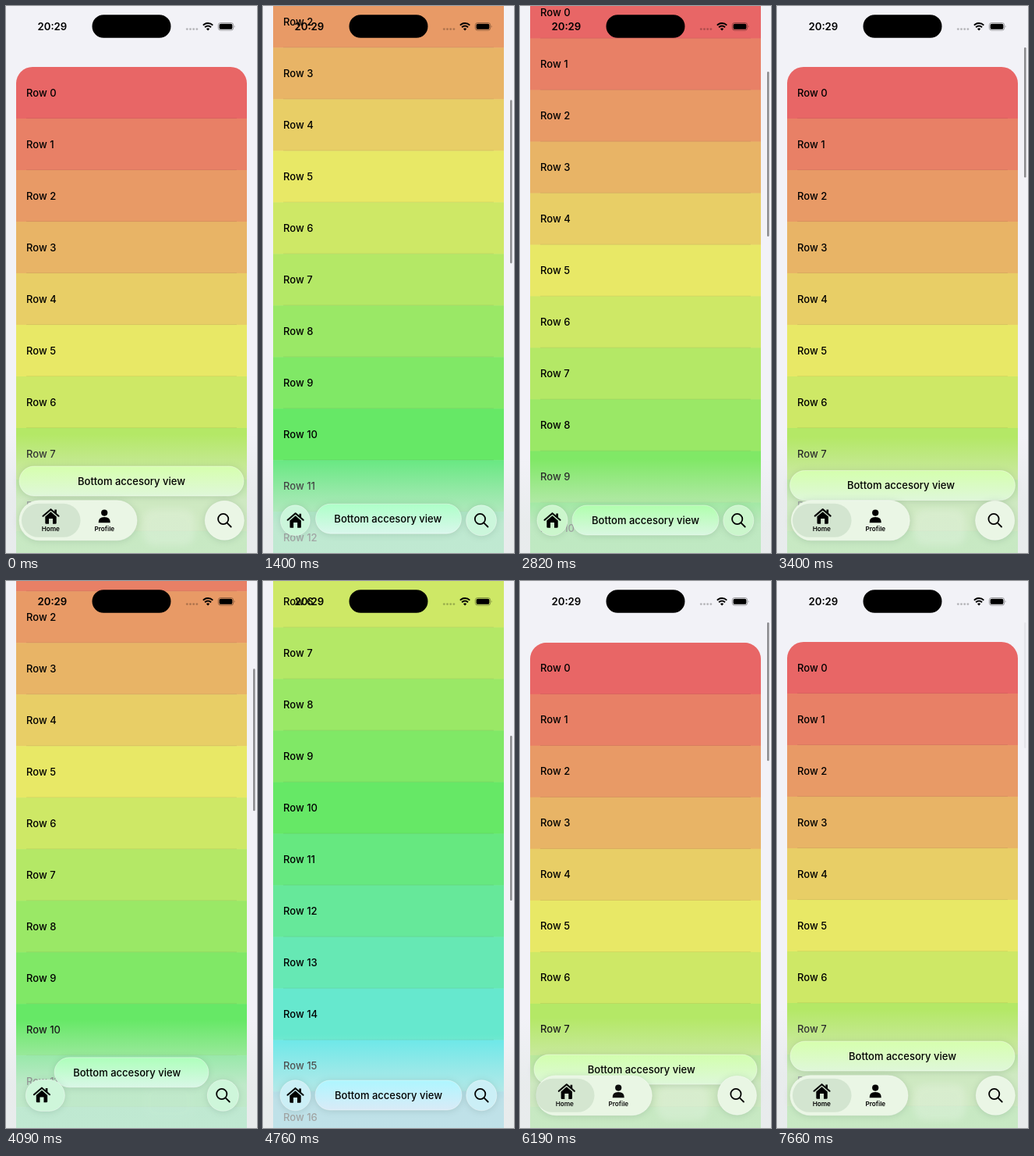
Animation of 322 by 700 pixels, one loop 7.87 s. Source, as an HTML page:

```html
<!DOCTYPE html>
<html lang="en">
<head>
<meta charset="utf-8">
<title>Collapsing tab bar</title>
<style>
  html, body { margin: 0; width: 100%; height: 100%; overflow: hidden; background: #f2f2f7; }
  svg { display: block; width: 100%; height: 100%; }
  text { font: 500 13px Inter, Roboto, sans-serif; }
  .time { font-weight: 600; font-size: 13.2px; }
  .label { font-weight: 600; font-size: 8.2px; text-anchor: middle; }
  .glass { stroke: #fff; stroke-opacity: .5; stroke-width: .8; filter: drop-shadow(0 1px 4px rgba(0, 40, 20, .13)); }
</style>
</head>
<body>
<svg viewBox="0 0 322 700">
  <defs>
    <clipPath id="card"><rect x="13" y="78" width="296" height="1980" rx="21"/></clipPath>
    <linearGradient id="fade" x1="0" y1="0" x2="0" y2="1">
      <stop offset="0" stop-color="#e4e9e8" stop-opacity="0"/>
      <stop offset=".3" stop-color="#e4e9e8" stop-opacity=".4"/>
      <stop offset=".55" stop-color="#e4e9e8" stop-opacity=".7"/>
      <stop offset="1" stop-color="#e4e9e8" stop-opacity=".72"/>
    </linearGradient>
    <linearGradient id="tint" x1="0" y1="0" x2="0" y2="1">
      <stop id="tintTop" offset="0"/>
      <stop id="tintEnd" offset="1"/>
    </linearGradient>
    <filter id="soft"><feGaussianBlur stdDeviation="4"/></filter>
  </defs>
  <rect width="322" height="700" fill="#f2f2f7"/>
  <g id="list"><g id="rows" clip-path="url(#card)"></g></g>
  <rect id="veil" width="322" height="152" fill="url(#fade)"/>
  <rect id="glow" x="176" y="644" width="66" height="46" rx="14" fill="#fff" opacity=".2" filter="url(#soft)"/>

  <g id="status">
    <text class="time" x="40.5" y="31">20:29</text>
    <rect x="110.5" y="11.2" width="101" height="29.6" rx="14.8"/>
    <g fill="#000" opacity=".25">
      <circle cx="232.3" cy="29.6" r="1.4"/><circle cx="236.5" cy="29.6" r="1.4"/>
      <circle cx="240.7" cy="29.6" r="1.4"/><circle cx="244.9" cy="29.6" r="1.4"/>
    </g>
    <g fill="none" stroke="#000" stroke-width="2">
      <path d="M252.9 24.6a8.7 8.7 0 0 1 12.4 0M255.2 27.2a5.5 5.5 0 0 1 7.8 0"/>
    </g>
    <path d="M257 29.2a3 3 0 0 1 4.2 0L259.1 31.5Z"/>
    <rect x="272.3" y="21.5" width="19.4" height="9.6" rx="3" fill="none" stroke="#000" stroke-opacity=".4" stroke-width=".9"/>
    <rect x="273.6" y="22.8" width="16.8" height="7" rx="1.9"/>
    <path d="M292.8 24.8q1.6 1.5 0 3Z" opacity=".45"/>
  </g>

  <rect id="bar" x="317" width="2.6" rx="1.3" fill="#000" fill-opacity=".42"/>

  <rect id="pill" class="glass" height="38" rx="19" fill="url(#tint)"/>
  <text id="pillText" text-anchor="middle">Bottom accesory view</text>

  <rect id="tabs" class="glass"/>
  <g id="tabDetails">
    <rect x="20" y="636.8" width="75.5" height="43" rx="21.5" fill="#1c5c28" fill-opacity=".11"/>
    <text class="label" x="57.3" y="672.3">Home</text>
    <text class="label" x="126.3" y="672.3">Profile</text>
    <circle cx="126.2" cy="648.6" r="4.1"/>
    <path d="M118.7 661.3q-.4-7.2 7.5-7.2t7.5 7.2Z"/>
  </g>
  <g id="house">
    <path d="M-10-.3L0-8.8 10-.3" fill="none" stroke="#000" stroke-width="2.1" stroke-linecap="round" stroke-linejoin="round"/>
    <path d="M4.8-8.4H7.4V-2L4.8-4.5ZM-7.2.4L0-5.8 7.2.4V8.6q0 1.2-1.2 1.2H2.5V3H-2.5V9.8H-6q-1.2 0-1.2-1.2Z"/>
  </g>
  <circle id="search" class="glass" cy="658.3"/>
  <g id="lens" fill="none" stroke="#000" stroke-width="1.8" stroke-linecap="round">
    <circle cx="-1.6" cy="-1.8" r="6.6"/><path d="M3.2 3L8.4 8.2"/>
  </g>
</svg>
<script>
const LOOP = 7870, ROW = 66, TOP = 78;
const $ = id => document.getElementById(id);
const set = (id, attrs) => { for (const k in attrs) $(id).setAttribute(k, attrs[k]); };
const mix = (a, b, p) => a + (b - a) * p;
const clamp = x => Math.max(0, Math.min(1, x));

// Finger drags and coasting: [time, offset, velocity]
const flicks = [
  [960, 0, 0], [1250, 105, .84], [1400, 222, .73], [1990, 474, .22], [2380, 535, .1],
  [2400, 536, 0], [2490, 536, 0], [2820, 104, -1.45], [2895, 0, -1.3],
  [3850, 0, 0], [4090, 196, .85], [5150, 513, .08], [5160, 513, 0], [5240, 513, 0],
  [5540, 218, -1.1], [5750, 0, -1]
];
const bounces = [[2895, 3850, 1.3], [5750, LOOP, 1]];
const collapses = [[1020, 3060], [3900, 5930]];

function scrollAt(t) {
  for (const [from, to, speed] of bounces) {
    const u = t - from;
    if (u >= 0 && t < to) return u > 500 ? 0 : -speed * u * Math.exp(-u / 70);
  }
  const i = flicks.findIndex(k => k[0] > t);
  if (i < 1) return 0;
  const [t0, s0, v0] = flicks[i - 1], [t1, s1, v1] = flicks[i];
  const d = t1 - t0, p = (t - t0) / d, q = 1 - p;
  return s0 * q * q * (1 + 2 * p) + s1 * p * p * (3 - 2 * p) + d * p * q * (v0 * q - v1 * p);
}

const spring = u => 1 - Math.exp(-u / 110) * Math.cos(u * .00514);
const glide = u => { const p = clamp(u / 430); return p * p * (3 - 2 * p); };

function collapseAt(t) {
  const span = collapses.filter(c => c[0] <= t).pop();
  if (!span) return { x: 0, y: 0 };
  const back = t - span[1];
  if (back > 550) return { x: 0, y: 0 };
  return back < 0
    ? { x: spring(t - span[0]), y: glide(t - span[0]) }
    : { x: 1 - spring(back), y: 1 - glide(back) };
}

function rowColor(i) {
  const f = n => {
    const k = (n + i / 5) % 6;
    return Math.round(232 - 130 * clamp(Math.min(k, 4 - k)));
  };
  return `rgb(${f(5)},${f(3)},${f(1)})`;
}

$("rows").innerHTML = Array.from({ length: 30 }, (_, i) => {
  const y = TOP + i * ROW;
  return `<rect x="13" y="${y}" width="296" height="${ROW + .5}" fill="${rowColor(i)}"/>` +
    (i ? `<path d="M26 ${y - .3}H296" stroke="#000" stroke-opacity=".1" stroke-width=".7"/>` : "") +
    `<text x="26" y="${y + 37.7}">Row ${i}</text>`;
}).join("");

function barOpacity(t) {
  if (t < 960) return 0;
  if (t < 7600) return clamp((t - 930) / 120);
  return t < 7660 ? .5 : .12;
}

function draw(t) {
  const s = scrollAt(t), { x, y } = collapseAt(t);
  const nudge = Math.sin(Math.PI * y);
  const hueAt = py => 12 * Math.max(0, (py + s - TOP) / ROW);

  set("list", { transform: `translate(0 ${-s})` });
  set("veil", { y: mix(548, 580, y) });
  set("glow", { opacity: .2 * clamp(1 - x) });
  set("bar", {
    y: 53 + .3016 * Math.max(0, s),
    height: Math.max(20, mix(161, 211, y) + Math.min(0, s)),
    opacity: barOpacity(t)
  });

  const pillY = mix(589, 639, y), hue = hueAt(pillY - 15);
  set("pill", { x: mix(17, 67, x), y: pillY, width: mix(288, 188, x) });
  set("pillText", { x: 161 - 6 * nudge, y: pillY + 23.7 });
  set("tintTop", { "stop-color": `hsl(${hue},100%,84%)` });
  set("tintEnd", { "stop-color": `hsl(${hue + 18},65%,91%)` });

  const h = mix(51, 39, x), disc = `hsl(${hueAt(640)},${mix(48, 70, clamp(x))}%,${mix(93, 88, clamp(x))}%)`;
  set("tabs", {
    x: mix(17, 22, x) + 4 * nudge, y: 658.3 - h / 2,
    width: mix(151, 39, x), height: h, rx: h / 2, fill: disc
  });
  set("tabDetails", { opacity: clamp(1 - 2.5 * x) });
  set("house", { transform: `translate(${mix(57.5, 41.5, x) + 3 * nudge} ${mix(653, 658, x)})` });
  const cx = 280.3 - 2 * nudge;
  set("search", { cx, r: mix(25, 19.5, x), fill: disc });
  set("lens", { transform: `translate(${cx} 658.3)` });
}

const start = performance.now();
function tick() {
  draw((performance.now() - start) % LOOP);
  requestAnimationFrame(tick);
}
tick();
</script>
</body>
</html>
```
